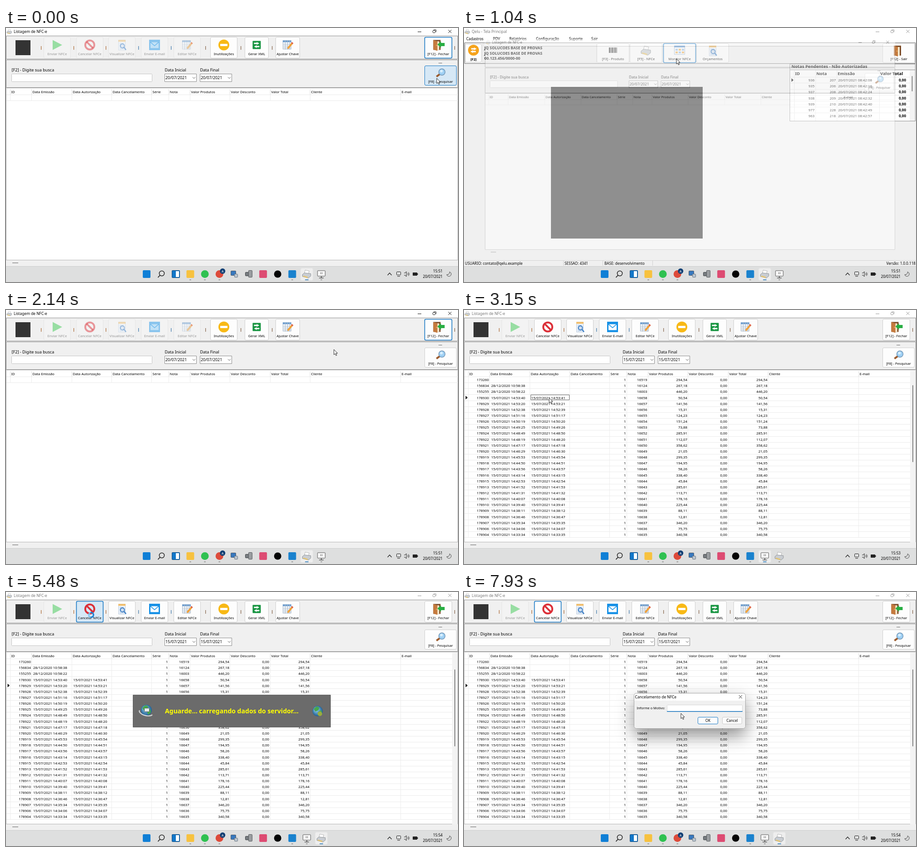
Animation, 998 px wide and 561 px high, one loop 8 s. Source, as an HTML page with a canvas:

```html
<!DOCTYPE html>
<html lang="pt-BR">
<head>
<meta charset="utf-8">
<title>Listagem de NFC-e</title>
<style>
html, body { margin: 0; width: 100%; height: 100%; overflow: hidden; background: #fff; }
canvas { display: block; }
</style>
</head>
<body>
<canvas id="stage" width="998" height="561"></canvas>
<script>
const W = 998, H = 561, LOOP = 8000;
const FONT = '"Noto Sans", "Open Sans", sans-serif';
const BLUE = '#1878c4', PANEL = '#f0f0f0', EDGE = '#8f8f8f', INK = '#222';
const main = document.getElementById('stage').getContext('2d');
const sheet = document.createElement('canvas');
sheet.width = W; sheet.height = H;
let g = main;

// ---------- helpers ----------
const ramp = (t, a, b) => Math.max(0, Math.min(1, (t - a) / (b - a)));
const within = (p, x, y, w, h) => p.x >= x && p.x < x + w && p.y >= y && p.y < y + h;
const two = n => String(n).padStart(2, '0');

function paint(fill, line, lw = 1) {
  if (fill) { g.fillStyle = fill; g.fill(); }
  if (line) { g.strokeStyle = line; g.lineWidth = lw; g.stroke(); }
}
function box(x, y, w, h, fill, line, r = 0, lw = 1) {
  const d = line ? 1 : 0;
  g.beginPath();
  g.roundRect(x + d / 2, y + d / 2, w - d, h - d, r);
  paint(fill, line, lw);
}
function disc(x, y, r, fill, line, lw) {
  g.beginPath(); g.arc(x, y, r, 0, 7); paint(fill, line, lw);
}
function path(pts, fill, line, lw) {
  g.beginPath();
  for (let i = 0; i < pts.length; i += 2) g.lineTo(pts[i], pts[i + 1]);
  if (fill) g.closePath();
  paint(fill, line, lw);
}
function text(s, x, y, size = 7.85, { c = '#000', a = 'left', w = 400 } = {}) {
  g.font = `${w} ${size}px ${FONT}`;
  g.textAlign = a; g.fillStyle = c;
  g.fillText(s, x, y + size * .36);
}
const RIGHT = { a: 'right' }, MID = { a: 'center' }, BOLD = { w: 700 };

function at(x, y, s, fn) {
  g.save(); g.translate(x, y); g.scale(s, s); fn(); g.restore();
}
// Draws a whole window apart so that it fades as one sheet.
function layer(alpha, scale, cx, cy, fn) {
  if (alpha <= 0) return;
  if (alpha >= 1) return fn();
  g = sheet.getContext('2d');
  g.clearRect(0, 0, W, H);
  fn();
  g = main;
  g.save();
  g.globalAlpha = alpha;
  g.translate(cx, cy); g.scale(scale, scale); g.translate(-cx, -cy);
  g.drawImage(sheet, 0, 0);
  g.restore();
}

// ---------- icons, centred on 0,0 ----------
function arrow(len, half, color) {
  path([-len, -half / 2, 0, -half / 2, 0, -half, len, 0, 0, half, 0, half / 2, -len, half / 2], color);
}
function swapArrows(dx, dy, color) {
  g.save(); g.translate(dx, -dy); arrow(6, 3, color);
  g.translate(-2 * dx, 2 * dy); g.scale(-1, 1); arrow(6, 3, color); g.restore();
}
const icon = {
  play() { path([-10, -11, 11, 0, -10, 11], '#34c64b'); },
  ban() {
    disc(0, 0, 10, null, '#dc3038', 4);
    path([-7, -7, 7, 7], null, '#dc3038', 4);
  },
  preview() {
    box(-8, -11, 16, 23, '#eef4fb', '#b9c9dc');
    box(-8, -11, 16, 4, '#f3bd67');
    for (let y = -4; y < 9; y += 3) box(-5, y, 9, 1, '#8fb0d6');
    disc(1, 2, 4.5, null, '#3f7fc4', 2);
    path([4, 5, 9, 11], null, '#3f7fc4', 2.5);
  },
  mail() {
    box(-12, -11.5, 24, 23, '#1590e6');
    box(-9, -6, 18, 13, '#fff');
    path([-9, -6, 0, 2, 9, -6], null, '#1590e6', 1.4);
  },
  table() {
    box(-11, -10, 19, 20, '#f4f8fd', '#a9b8c8');
    box(-11, -10, 19, 4, '#6f9fd0');
    for (let i = 1; i < 4; i++) {
      box(-11 + i * 5, -10, 1, 20, '#a9b8c8');
      box(-11, -6 + i * 4, 19, 1, '#a9b8c8');
    }
    path([11, -5, 0, 8], null, '#f0a23c', 4);
    path([11, -5, 9, -3], null, '#dc5a50', 4);
  },
  minus() {
    disc(0, 0, 12, '#f8b916');
    box(-8, -2.5, 16, 5, '#fff', null, 1);
  },
  swap() {
    box(-9, -9, 18, 18, '#169440', null, 1);
    swapArrows(0, 3.5, '#fff');
  },
  transfer() {
    disc(0, 0, 12, '#f5a31b');
    swapArrows(1, 3, '#fff');
  },
  door() {
    box(-11, -11, 16, 22, '#7b4a26');
    box(-8, -8, 10, 19, '#f6e8cb');
    path([-11, -11, -2, -8, -2, 13, -11, 10], '#c57a3e');
    disc(-4, 1, 1, '#f4d27a');
  },
  exit() {
    icon.door();
    at(6, -1, -1, () => arrow(8, 7, '#27ae42'));
  },
  lens() {
    path([-1, 2, -9, 8], null, '#9b5a2c', 4);
    disc(3, -2, 7, '#9fd0f4', '#6f93b3', 1.4);
    disc(2, -4, 3, '#d8eefc');
  },
  bars() {
    box(-10, -8, 20, 14, '#fff');
    for (let i = 0; i < 9; i++) box(-9 + i * 2.1, -7, i % 3 ? 1 : 1.6, 12, INK);
  },
  printer() {
    path([-4, -10, 6, -8, 4, 0, -6, -1], '#fff', '#9a9a9a', .8);
    path([-11, 1, -6, -3, 10, -1, 10, 5, 4, 10, -11, 6], '#c9cdd2', '#74797f', .8);
    path([-8, 4, 3, 7, 1, 10, -10, 6], '#e7c56c');
  },
  panel() {
    box(-12, -11, 24, 20, '#f7fbff', '#9cb4cf');
    box(-12, -11, 24, 4, '#6fa4dc');
    for (let i = 0; i < 6; i++) box(-9 + i % 3 * 7, -4 + (i > 2) * 6, 5, 4, i % 2 ? '#f0b458' : '#9bc0e8');
  },
  screen() {
    box(-9, -8, 18, 13, '#f8f8f8', '#555', 1);
    box(-1, 5, 2, 3, '#555'); box(-5, 8, 10, 1.4, '#555');
    for (const x of [-2, 1]) box(x, -4, 1, 4, '#555');
  },
  globe() {
    const sky = g.createRadialGradient(-4, -5, 1, 0, 0, 13);
    sky.addColorStop(0, '#9fdcf5'); sky.addColorStop(1, '#15568f');
    disc(0, 0, 12, sky);
    path([-9, -5, -2, -11, 4, -8, 2, -2, -5, 1], '#48a84c');
    path([1, 2, 9, -2, 10, 5, 4, 10], '#48a84c');
  }
};
const put = (name, x, y, s = 1) => at(x, y, s, icon[name]);

// state letters: o = disabled, h = hovered, f = focused
function button(x, y, w, h, label, pic, state = '') {
  const off = state.includes('o'), hot = state.includes('h'), foc = state.includes('f');
  box(x, y, w, h, off ? '#f3f3f3' : hot ? '#d6e8f6' : '#fdfdfd',
    foc || hot ? BLUE : off ? '#e6e6e6' : '#cfcfcf', 2.5, foc ? 1.6 : 1);
  g.save();
  if (off) g.globalAlpha *= .48;
  put(pic, x + w / 2, y + h * .37);
  g.restore();
  text(label, x + w / 2, y + h * .8, 7.6, { c: off ? '#959595' : '#000', a: 'center' });
}
function smallButton(x, y, w, h, label, foc, hot) {
  box(x, y, w, h, hot ? '#d6e6f3' : '#fdfdfd', foc || hot ? BLUE : '#c8c8c8', 2.5);
  text(label, x + w / 2, y + h / 2, 8, MID);
}
function cross(x, y, c) {
  for (const d of [-3.5, 3.5]) path([x - 3.5, y - d, x + 3.5, y + d], null, c);
}
function titleBar(title, on) {
  const c = on ? '#111' : '#979797';
  box(0, 0, W, 17, '#fff');
  put('printer', 7.5, 8, .52);
  text(title, 17, 8, 8.4, { c: on ? '#000' : '#777' });
  box(909, 8, 8, 1, c);
  box(942, 5, 6, 6, null, c, 1);
  path([944, 4, 949.5, 4, 949.5, 9], null, c);
  cross(980, 7.5, c);
}
function thumb(x, y, h) {
  box(x, y, 2, h, '#858585', null, 1);
}

// ---------- list data ----------
const STEP = 13.15;
const HEADS = [['ID', 10], ['Data Emissão', 57], ['Data Autorização', 146], ['Data Cancelamento', 234],
  ['Série', 322], ['Nota', 360], ['Valor Produtos', 407], ['Valor Desconto', 495], ['Valor Total', 584],
  ['Cliente', 672], ['E-mail', 872]];
const money = n => n.toFixed(2).replace('.', ',').replace(/(\d)(\d{3},)/, '$1.$2');
const stamp = s => `15/07/2021 14:${two(Math.floor(s / 60))}:${two(s % 60)}`;

function makeRows() {
  let seed = 11, sec = 53 * 60 + 40;
  const rnd = () => (seed = seed * 16807 % 2147483647) / 2147483647;
  const rows = [
    [173260, '', '', 16519, 294.54],
    [156834, '28/12/2020 10:58:38', '', 16124, 267.18],
    [155255, '28/12/2020 10:58:22', '', 16003, 446.2]
  ];
  for (let i = 0; i < 24; i++) {
    const sum = i ? 12 + 470 * rnd() ** 1.6 : 50.54;
    rows.push([178930 - i - Math.floor((i + 1) / 8), stamp(sec), stamp(sec + 1), 16658 - i, sum]);
    sec -= Math.round(20 + 72 * rnd());
  }
  return rows;
}
const ROWS = makeRows();

// ---------- list window ----------
function toolbar(full, t, p) {
  const off = full ? '' : 'o';
  const cancel = full && (t < 5690 && within(p, 155, 20, 60, 47) ? 'h' : '') + (t >= 5280 ? 'f' : '');
  box(21, 27, 33, 33, '#333');
  [['Enviar NFCe', 'play', 'o'], ['Cancelar NFCe', 'ban', cancel || off], ['Visualizar NFCe', 'preview', off],
    ['Enviar E-mail', 'mail', off], ['Editar NFCe', 'table', off]].forEach(([label, pic, state], i) => {
    const x = Math.round(83 + i * 71.7);
    box(x - 6, 40, 1.3, 8, i % 5 < 3 ? '#b0703f' : '#4a80b0');
    button(x, 20, 60, 47, label, pic, state);
  });
  for (const x of [440, 518, 587, 990]) box(x, 40, 1.3, 8, '#8a6a50');
  button(451, 20, 60, 47, 'Inutilizações', 'minus');
  button(527, 20, 53, 47, 'Gerar XML', 'swap');
  button(595, 20, 54, 47, 'Ajustar Chave', 'table');
  button(924, 20, 61, 47, '[F12] - Fechar', 'exit', full ? '' : 'f');
}
function dateField(x, label, value) {
  text(label, x + .5, 93, 9);
  box(x, 101, 71, 18, '#fff', '#8c8c8c');
  text(value, x + 2, 110, 8.9);
  path([x + 62, 108.5, x + 65, 111.5, x + 68, 108.5], null, '#555');
}
function grid(full, t) {
  const row = t < 3930 ? 3 : 4, y = 154 + row * STEP;
  const count = full ? ROWS.length : 1, end = full ? 985 : W;
  box(0, 132, W, 381, '#fff', '#b4b4b4');
  for (const [label, x] of HEADS) {
    box(x - 1, 135, 1, 12, '#dcdcdc');
    box(x - 1, 147, 1, count * STEP, '#ececec');
    text(label, x + 1.5, 141, 7.65);
  }
  for (let i = 0; i <= count; i++) box(1, Math.round(147 + i * STEP), end - 1, 1, '#ebebeb');
  box(0, 513, W, 13, PANEL);
  box(14, 518, 13, 1.4, '#858585');
  if (!full) return;
  ROWS.forEach(([id, out, auth, note, sum], i) => {
    const y = 154.3 + i * STEP;
    text(out, 60, y);
    text(auth, 148.5, y);
    [[id, 55], ['1', 357.5], [note, 404.5], [money(sum), 493], ['0,00', 581], [money(sum), 670]]
      .forEach(([s, x]) => text(s, x, y, 7.85, RIGHT));
  });
  path([3.5, y - 4, 8, y, 3.5, y + 4], '#000');
  if (t < 5280) box(147, Math.round(y - 6), 86, 12, null, '#666');
  box(985, 134, 12, 379, '#f3f3f3');
  thumb(990, t < 3930 ? 166 : 171, 170);
}
function listWindow(t, p, full, on, tools = true) {
  const day = full ? '15/07/2021' : '20/07/2021';
  titleBar('Listagem de NFC-e', on);
  box(0, 17, W, 509, PANEL);
  box(0, 17, W, 52, null, EDGE);
  box(0, 70, W, 62, null, EDGE);
  if (tools) toolbar(full, t, p);
  text('[F2] - Digite sua busca', 12.5, 93, 9.1);
  box(12, 101, 311, 18, '#fff', '#c4c4c4', 1);
  dateField(350, 'Data Inicial', day);
  dateField(428, 'Data Final', day);
  text('---', 959, 77, 8.5, MID);
  button(924, 83, 71, 44, '[F8] - Pesquisar', 'lens', tools && within(p, 924, 83, 71, 44) ? 'h' : '');
  grid(full, t);
}

// ---------- main window ----------
const PENDING = ['936 207', '935 206', '937 208', '938 209', '939 210', '977 228', '963 218'];
function pendingPanel() {
  box(719, 79, 278, 127, PANEL, EDGE);
  text('Notas Pendentes - Não Autorizadas', 723, 85, 9.5, BOLD);
  box(719, 92, 278, 114, '#fff', EDGE);
  [['ID', 731], ['Nota', 778], ['Emissão', 825], ['Valor Total', 919]].forEach(([s, x]) => {
    text(s, x, 101, 9.4, BOLD);
    box(x - 2, 93, 1, 112, '#e4e4e4');
  });
  PENDING.forEach((pair, i) => {
    const y = 115.3 + i * STEP, [id, note] = pair.split(' ');
    box(720, Math.round(y - 7), 264, 1, '#e6e6e6');
    text(id, 774, y, 7.85, RIGHT);
    text(note, 821, y, 7.85, RIGHT);
    text('20/07/2021 08:42:' + two(Math.round(8 + 8.1 * i)), 826, y);
    text('0,00', 976, y, 8, { a: 'right', w: 700 });
  });
  path([723, 111, 727.5, 115, 723, 119], '#000');
  box(984, 93, 12, 112, '#f3f3f3');
  thumb(988.5, 106, 34);
}
function mainWindow(on, p) {
  const over = within(p, 440, 34, 72, 43);
  titleBar('Qelu - Tela Principal', on);
  box(0, 16, W, 16, '#fff');
  [['Cadastros', 5], ['PDV', 64], ['Relatórios', 100], ['Configuração', 159], ['Suporte', 232], ['Sair', 281]]
    .forEach(([s, x]) => text(s, x, 24, 8.1));
  box(0, 32, W, 494, PANEL);
  box(1, 32, 996, 47, null, '#777');
  box(2, 35, 37, 41, '#fdfdfd', '#cfcfcf', 2.5);
  put('transfer', 21, 49);
  text('[F2]', 21, 69, 7.6, { w: 700, a: 'center' });
  box(41, 34, 252, 43, null, '#dedede');
  ['JQ SOLUCOES BASE DE PROVAS', 'JQ SOLUCOES BASE DE PROVAS', '00.123.456/0000-00']
    .forEach((s, i) => text(s, 45, 44 + i * 11.6, 8.5, BOLD));
  [['[F3] - Produto', 'bars'], ['[F5] - NFCe', 'printer'],
    ['Monitor NFCe', 'panel', over ? (on ? 'h' : 'f') : ''], ['Orçamentos', 'preview']]
    .forEach(([label, pic, state], i) => button(Math.round(293 + i * 73.4), 34, 72, 43, label, pic, state));
  button(924, 34, 72, 43, '[F12] - Sair', 'door');
  box(192, 130, 335, 335, '#333');
  pendingPanel();

  box(0, 513, W, 1, '#d4d4d4');
  for (const x of [219, 306, 416]) box(x, 514, 1, 11, '#cfcfcf');
  text('USUARIO: contato@qelu.example', 2, 520, 8.1);
  text('SESSAO: 4341', 222, 520, 8.1);
  text('BASE: desenvolvimento', 310, 520, 8.1);
  text('Versão: 1.0.0.118', 997, 520, 8.1, RIGHT);
}

// ---------- taskbar ----------
function tray(t) {
  path([842.5, 546, 847, 541, 851.5, 546], null, INK, 1.2);
  box(862, 538, 10, 8, null, INK, 1);
  box(864, 548, 6, 1, INK);
  path([879, 541, 881, 541, 884, 538, 884, 549, 881, 546, 879, 546], null, INK);
  for (const r of [2.5, 5]) { g.beginPath(); g.arc(885, 543.5, r, -.9, .9); paint(null, INK); }
  box(898, 540, 10, 7, INK, null, 1);
  box(908, 542, 1.5, 3, INK);
  text(t < 3150 ? '15:51' : t < 4800 ? '15:53' : '15:54', 964, 537.5, 8.2, RIGHT);
  text('20/07/2021', 964, 549, 8.2, RIGHT);
  g.beginPath(); g.arc(978, 543.5, 5, -1.3, 2.9); g.quadraticCurveTo(980, 545, 979.3, 538.7);
  paint(null, '#444');
}
function taskbar(t) {
  const later = t >= 3150, y = 543.5, slot = i => 310.5 + i * 32.15;
  const screenX = slot(later ? 11 : 12), printX = slot(later ? 12 : 11);
  const idle = (t >= 70 && t < 200) || (later && t < 3290);
  const active = idle ? screenX : printX;
  box(0, 526, W, 35, '#dedfdf');
  box(0, 526, W, 1, '#cdcdcd');
  box(active - 14, 530, 28, 28, '#eeeeee', '#e6e6e6', 3);

  const tile = (i, c) => box(slot(i) - 8.5, y - 8.5, 17, 17, c, null, 2);
  tile(0, '#0f7fd6'); tile(3, '#f7c23f'); tile(8, '#dd4b72'); tile(10, '#1a82ce');
  disc(slot(4), y, 8.5, '#2fc151');
  disc(slot(5), y, 8.5, '#dd4b3b');
  disc(slot(9), y, 8, '#050505');
  disc(slot(5) + 7, 537, 6, '#123f74');
  text('A', slot(5) + 7, 537, 7, { c: '#fff', a: 'center' });

  disc(344, 542, 5.6, null, INK, 1.5);
  path([340, 546, 335.5, 551], null, INK, 1.8);
  box(366, 535, 18, 17, '#1277c9', '#184a78', 1);
  box(375, 537, 7, 13, '#fff');
  box(496, 536, 12, 11, '#3878bd', '#555b63', 1);
  box(504, 543, 8, 8, '#b9c4cf', '#6c7680', 1);
  box(528, 539, 9, 9, '#777c80', '#44484b', 1);
  box(535, 535, 9, 16, '#9a9da0', '#55595c', 1);
  put('printer', printX, y, .88);
  put('screen', screenX, y);
  for (const x of [3, 4, 5, 10, 11, 12].map(slot)) {
    const w = x === active ? 8 : 4;
    box(x - w / 2, 555.5, w, 1.6, x === active ? '#1a72b8' : '#868686', null, 1);
  }
  tray(t);
}

// ---------- popups ----------
function waitBox() {
  box(280, 227, 437, 72, '#6b6b6b', '#5c5c5c');
  text('Aguarde... carregando dados do servidor...', 498.5, 263, 14.05, { c: '#ffff00', a: 'center', w: 700 });
  put('globe', 310, 261);
  box(305, 256, 12, 9, '#e6ece8', '#45565e', 1);
  g.beginPath(); g.ellipse(309, 266, 15, 7, .25, .2, 3.3);
  paint(null, '#d2d6d8', 2.2);
  put('globe', 688, 263, .95);
  disc(693, 269, 5, '#9aac3c');
}
function frame(x, y, w, h, title) {
  g.save();
  g.shadowColor = 'rgba(0,0,0,.42)'; g.shadowBlur = 36; g.shadowOffsetY = 16;
  box(x, y, w, h, PANEL, null, 5);
  g.restore();
  box(x, y, w, 17, '#fff', null, [5, 5, 0, 0]);
  box(x, y, w, h, null, '#a4a4a4', 5);
  text(title, x + 2.5, y + 8.5, 8.4);
  cross(x + w - 11.5, y + 8.5, INK);
}
function confirmBox(p) {
  const blue = g.createRadialGradient(418, 267, 1, 421, 272, 12);
  blue.addColorStop(0, '#6f9cf0'); blue.addColorStop(1, '#12388f');
  frame(400, 232, 198, 96, 'Confirmação');
  disc(421.5, 272.5, 11, blue, '#c9cdd6', 1.5);
  text('?', 421.5, 272.5, 17, { c: '#fff', a: 'center', w: 700 });
  text('Confirma o cancelamento do NFCe?', 444, 267, 8.4);
  smallButton(443, 299, 53, 18, 'Sim', false, within(p, 443, 299, 53, 18));
  smallButton(502, 299, 53, 18, 'Não', true);
}
function reasonBox() {
  frame(375, 223, 247, 79, 'Cancelamento de NFCe');
  text('Informe o Motivo:', 381.5, 256, 7.4);
  box(448, 249, 167, 16, '#fff', '#d6d6d6', 1);
  box(448, 263, 167, 1.6, BLUE);
  smallButton(516, 276, 45, 16, 'OK', true);
  smallButton(570, 276, 44, 16, 'Cancel');
}

// ---------- pointer: time, x, y; a repeated time is a jump ----------
const MOVES = [
  [0, 951, 111], [70, 951, 111], [70, 430, 122], [530, 469, 68], [1740, 469, 68], [2560, 893, 100],
  [2820, 951, 111], [3150, 951, 111], [3150, 188, 194], [3670, 185, 204], [4330, 185, 204],
  [5010, 183, 45], [5690, 183, 45], [6360, 455, 291], [6700, 464, 305], [7250, 464, 305],
  [7930, 479, 268], [LOOP, 479, 268]
];
function pointerAt(t) {
  const i = MOVES.findIndex(m => m[0] > t);
  const [a, ax, ay] = MOVES[i - 1], [b, bx, by] = MOVES[i];
  const k = 1 - (1 - ramp(t, a, b)) ** 1.37;
  return { x: ax + (bx - ax) * k, y: ay + (by - ay) * k };
}
function pointer(t, p) {
  if (t >= 5480 && t < 5690) {
    disc(p.x + 5, p.y + 5.5, 5.2, null, '#7cc4f2', 3);
    g.beginPath(); g.arc(p.x + 5, p.y + 5.5, 5.2, t / 130, t / 130 + 3.6);
    paint(null, '#1b7fd0', 3);
    return;
  }
  at(p.x, p.y, 1, () =>
    path([0, 0, 0, 11.5, 2.6, 9.2, 4.6, 13.4, 6.4, 12.6, 4.5, 8.4, 8, 8.2, 0, 0], '#fff', '#111', .9));
}

function draw(t) {
  const p = pointerAt(t), full = t >= 3150;
  if (t >= 70 && t < 1180) {
    const a = ramp(t, 950, 1150);
    mainWindow(t >= 200 && t < 900, p);
    layer(a, 1 - .17 * (1 - a), 499, 262, () => listWindow(t, p, false, true, false));
  } else {
    listWindow(t, p, full, !full || (t >= 3290 && t < 5480));
  }
  taskbar(t);
  if (t >= 5480 && t < 5620) waitBox();
  const ask = Math.min(ramp(t, 5640, 5830), 1 - ramp(t, 7250, 7390));
  layer(ask, .9 + .1 * ask, 499, 280, () => confirmBox(p));
  const why = ramp(t, 7380, 7570);
  layer(why, .9 + .1 * why, 498.5, 262, reasonBox);
  pointer(t, p);
}

const start = performance.now();
function tick() {
  draw((performance.now() - start) % LOOP);
  requestAnimationFrame(tick);
}
tick();
</script>
</body>
</html>
```
